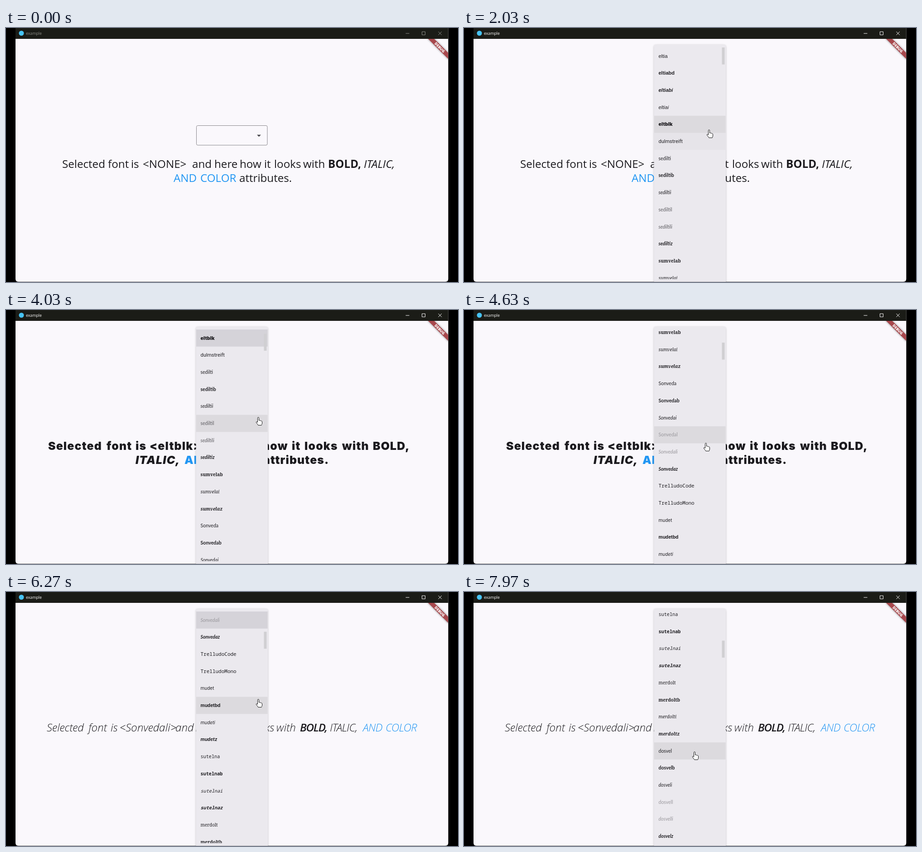
An HTML page that plays this animation: 998 by 561 pixels, repeating every 8000 ms.

```html
<!DOCTYPE html>
<html lang="en">
<head>
<meta charset="utf-8">
<title>Font picker</title>
<style>
  html, body { margin: 0; width: 100%; height: 100%; overflow: hidden; background: #000; }
  svg { display: block; width: 100vw; height: 100vh; }
  text { white-space: pre; }
  .ui { font-family: "Open Sans", "Noto Sans", sans-serif; }
  #sentences { fill: #1c1b1f; }
  .plain { font: 24.2px "Open Sans", "Noto Sans", sans-serif; }
  .heavy { font: 900 24.8px Inter, "Liberation Sans", sans-serif; letter-spacing: 1.15px; }
  .light { font: italic 300 24.2px "Open Sans", "Noto Sans", sans-serif; }
  .bold { font-weight: 700; }
  .light .bold { font-weight: 600; letter-spacing: -1.2px; }
  .light .italic, .light .blue { letter-spacing: -.6px; }
  .heavy .bold { font-weight: 900; }
  .italic { font-style: italic; }
  .blue { fill: #2196f3; }
</style>
</head>
<body>
<svg viewBox="0 0 998 561">
  <defs>
    <clipPath id="window"><path d="M21 0H976.5V554q0 6.5-6.5 6.5H27.5q-6.5 0-6.5-6.5Z"/></clipPath>
    <clipPath id="body"><rect x="21" y="24" width="955.5" height="537"/></clipPath>
    <clipPath id="viewport"><rect x="419" y="43" width="160" height="511.7"/></clipPath>
    <filter id="blur" x="-20%" y="-50%" width="140%" height="200%"><feGaussianBlur stdDeviation="2"/></filter>
  </defs>

  <g clip-path="url(#window)">
    <rect x="21" width="956" height="561" fill="#faf8fc"/>
    <rect x="21" width="956" height="24" fill="#1b1c17"/>
    <circle cx="34" cy="11.5" r="5.5" fill="#47c3f4"/>
    <text id="title" class="ui" x="44" y="15.3" font-size="8.8">example</text>
    <path id="buttons" d="M882.5 12h8M918.5 8.2h7v7h-7ZM954.5 8l7.5 7.5M962 8l-7.5 7.5" fill="none"/>

    <g clip-path="url(#body)">
      <g transform="translate(976.5 24) rotate(45)">
        <rect x="-32" y="22" width="64" height="9.4" fill="#000" opacity=".5" filter="url(#blur)"/>
        <rect x="-32" y="22" width="64" height="9.4" fill="#a8484d"/>
        <text class="ui" y="29.7" font-size="8.3" font-weight="800" fill="#fff" text-anchor="middle">DEBUG</text>
      </g>
    </g>

    <g id="field">
      <rect id="outline" x="420.5" y="215.5" width="156.5" height="43.3" rx="3" fill="none"/>
      <circle id="halo" cx="558" cy="237.3" r="15.7" fill="#e9e8eb"/>
      <path d="M554 235.8h9l-4.5 4.5Z" fill="#49474d"/>
      <text id="value" class="ui" x="429.5" y="242" font-size="11.8" letter-spacing=".4" fill="#37353a"></text>
    </g>

    <g id="sentences"></g>

    <g id="menu">
      <rect x="419.5" y="38" width="158.5" height="530" rx="4" fill="#000" opacity=".22" filter="url(#blur)"/>
      <rect x="419.5" y="36.5" width="158.5" height="530" rx="3.5" fill="#ebe9ee"/>
      <g clip-path="url(#viewport)">
        <g id="list">
          <g id="rows" fill="#1c1b1f"></g>
          <g id="items"></g>
        </g>
      </g>
      <rect id="thumb" x="569.5" width="6" height="37.5" fill="#d0cfd2"/>
    </g>
  </g>

  <g id="cursor" stroke-linejoin="round">
    <path id="hand" fill="#fff" stroke="#111" d="M-1.5 1.5a1.5 1.5 0 0 1 3 0V7c1-.8 2.3-.4 2.6.5 1-.5 2.1-.1 2.4.8 1-.4 2 .1 2 1.4V13c0 2-1 3-1.4 4.5H-.2C-.8 15.5-4.6 12.5-4.6 10.8c0-1.4 1.6-1.6 3.1.4Z"/>
    <path id="arrow" fill="#000" stroke="#fff" stroke-width=".8" d="M0 0V12.4L2.9 9.8 5 14.6 7.1 13.6 5 9H8.8Z"/>
  </g>
</svg>

<script>
const LOOP = 8000, ROW = 37.7, NOTCH = 104.7, TOP = 43.1;
const $ = id => document.getElementById(id);

function add(parent, tag, attrs, content = '') {
  const node = document.createElementNS('http://www.w3.org/2000/svg', tag);
  for (const key in attrs) node.setAttribute(key, attrs[key]);
  node.textContent = content;
  parent.append(node);
  return node;
}
const show = (node, on) => node.setAttribute('visibility', on ? 'inherit' : 'hidden');

// family, font, size, style suffixes
const families = [
  ['eltia', 'Liberation Sans', 11, ['', 'bd', 'bi', 'i']],
  ['eltblk', 'Inter', 10.8, ['']],
  ['dulmstreift', 'Roboto', 11, ['']],
  ['sedilti', 'Lato', 10.5, ['', 'b', 'i', 'l', 'li', 'z']],
  ['sumvela', 'Noto Serif', 10, ['b', 'i', 'z']],
  ['Sonveda', 'Lato', 10.6, ['', 'b', 'i', 'l', 'li', 'z']],
  ['TrelludoCode', 'Noto Sans Mono', 11, ['']],
  ['TrelludoMono', 'Noto Sans Mono', 11, ['']],
  ['mudet', 'Inter', 10, ['', 'bd', 'i', 'z']],
  ['sutelna', 'Noto Sans Mono', 10.2, ['', 'b', 'i', 'z']],
  ['merdolt', 'Noto Serif', 10, ['', 'b', 'i', 'z']],
  ['dosvel', 'Lato', 10.5, ['', 'b', 'i', 'l', 'li', 'z']]
];

let count = 0;
for (const [name, font, size, suffixes] of families) {
  const generic = /Mono/.test(font) ? 'monospace' : /Serif/.test(font) ? 'serif' : 'sans-serif';
  for (const suffix of suffixes) {
    const thin = /l/.test(suffix);
    const weight = name === 'eltblk' ? 900 : /[bz]/.test(suffix) ? 700 : 400;
    add($('items'), 'text', {
      x: 429.5, y: TOP + ROW * (count + .5) + 3.6,
      fill: !thin ? '#1f1e22' : name === 'sedilti' ? '#5c5b60' : '#99979c',
      style: `font:${/[iz]/.test(suffix) ? 'italic' : 'normal'} ${weight} ${size}px "${font}",${generic}`
    }, name + suffix);
    count++;
  }
}

const rowNodes = Array.from({ length: count }, (_, i) =>
  add($('rows'), 'rect', { x: 420, y: TOP + ROW * i, width: 157.5, height: ROW }));

// Each choice: when it is made, its row, its style, left edge of every word, first word of line two
const choices = [
  { time: 0, row: -1, name: '', style: 'plain', split: 12,
    lefts: [125, 226, 277, 303, 412, 461, 517, 571, 593, 657, 712, 791, 371, 430, 516] },
  { time: 2450, row: 4, name: 'eltblk', style: 'heavy', split: 11,
    lefts: [94, 223, 287, 318, 438, 497, 567, 632, 660, 743, 811, 287, 395, 463, 569] },
  { time: 5200, row: 19, name: 'Sonvedali', style: 'light', split: 14,
    lefts: [91, 183, 232, 252, 375, 419, 470, 518, 540, 598, 650, 716, 789, 839, 447] }
];
const wordStyle = { 10: 'bold', 11: 'italic', 12: 'blue', 13: 'blue' };

for (const choice of choices) {
  choice.node = add($('sentences'), 'g', { class: choice.style });
  const words = `Selected font is <${choice.name || 'NONE'}> and here how it looks with BOLD, ITALIC, AND COLOR attributes.`.split(' ');
  words.forEach((word, i) => add(choice.node, 'text', {
    x: choice.lefts[i] - 1,
    y: (i < choice.split ? 308.8 : 340.2) - (choice.style === 'light' ? .6 : 0),
    class: wordStyle[i] || ''
  }, word));
}

const openings = [[1250, 2450], [3700, 5200], [6200, LOOP]];
const scrolls = [
  [0, 0],
  [3700, 4 * ROW], [4200, 4 * ROW + NOTCH], [4350, 4 * ROW + 2 * NOTCH], [4500, 4 * ROW + 3 * NOTCH],
  [6200, 19 * ROW], [6600, 19 * ROW + NOTCH], [6700, 19 * ROW + 2 * NOTCH], [7620, 19 * ROW + 3 * NOTCH]
];
const path = [
  [40, 940, 11], [530, 558, 237], [1900, 556, 237], [2030, 541, 225], [2450, 541, 222],
  [2900, 544, 230], [3250, 557, 237], [4100, 557, 237], [4500, 534, 294], [4650, 534, 294],
  [4900, 534, 306], [5200, 533, 310], [5530, 543, 242], [5750, 557, 237], [6350, 557, 237],
  [6700, 534, 307], [7450, 531, 312], [7970, 509, 353]
];

const isOpen = t => openings.some(([from, to]) => t >= from && t < to);
const scrollAt = t => scrolls.filter(([time]) => time <= t).pop()[1];

function pointer(t) {
  const next = path.findIndex(([time]) => time > t);
  if (next < 1) return (next ? path[path.length - 1] : path[0]).slice(1);
  const [t0, x0, y0] = path[next - 1], [t1, x1, y1] = path[next];
  const u = (t - t0) / (t1 - t0), k = u * u * (3 - 2 * u);
  return [x0 + (x1 - x0) * k, y0 + (y1 - y0) * k];
}
const hoveredRow = t => isOpen(t) ? Math.floor((pointer(t)[1] - TOP + scrollAt(t)) / ROW) : -1;

function draw(t) {
  const open = isOpen(t), offset = scrollAt(t), [x, y] = pointer(t);
  const choice = choices.filter(c => c.time <= t).pop();
  const onButton = !open && Math.hypot(x - 558, y - 237.3) < 15;

  const chrome = t >= 1250 ? '#fff' : '#8d8e89';
  $('title').setAttribute('fill', chrome);
  $('buttons').setAttribute('stroke', chrome);

  choices.forEach(c => show(c.node, c === choice));
  show($('field'), !open);
  show($('halo'), onButton);
  $('outline').setAttribute('stroke', onButton ? '#3a393d' : '#88868b');
  $('value').textContent = choice.name;

  show($('menu'), open);
  if (open) {
    const hovered = hoveredRow(t), left = hoveredRow(t - 100);
    rowNodes.forEach((node, i) => node.setAttribute('opacity',
      i === hovered ? .075 : i === choice.row ? .1 : i === left ? .02 : 0));
    $('list').setAttribute('transform', `translate(0 ${-offset})`);
    $('thumb').setAttribute('y', 43 + offset * .0625);
  }

  show($('cursor'), t >= path[0][0]);
  $('cursor').setAttribute('transform', `translate(${x} ${y})`);
  show($('hand'), open || onButton);
  show($('arrow'), !open && !onButton);
}

function tick() {
  draw(performance.now() % LOOP);
  requestAnimationFrame(tick);
}
tick();
</script>
</body>
</html>
```
